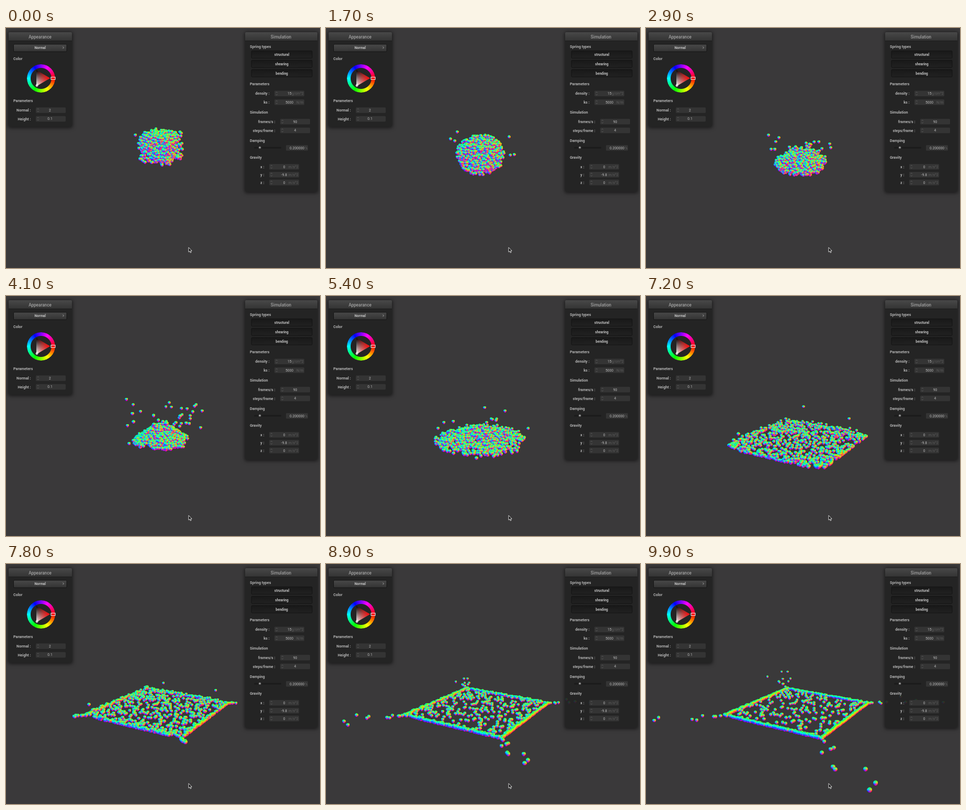
An HTML page with a canvas for the animation above (10000 ms loop, 600 by 457 pixels).

```html
<!DOCTYPE html>
<html lang="en">
<head>
<meta charset="utf-8">
<title>Particle simulation</title>
<style>
html, body { margin: 0; width: 100%; height: 100%; overflow: hidden; background: #3a393a; }
canvas, svg, div { position: absolute; left: 0; top: 0; }
.panel { background: rgba(34,34,34,.9); border-radius: 2px; box-shadow: 0 1px 7px 1px rgba(0,0,0,.6); }
.panel::before { content: ""; display: block; height: 16px; border-radius: 2px 2px 0 0;
  background: linear-gradient(#484848, #343434); border-bottom: 1px solid #1c1c1c; }
.wheel { left: 40px; top: 69px; width: 54px; height: 54px; border-radius: 50%;
  background: conic-gradient(from 90deg, red, yellow, lime, cyan, blue, magenta, red);
  -webkit-mask: radial-gradient(circle, transparent 19.5px, #000 20.5px);
  mask: radial-gradient(circle, transparent 19.5px, #000 20.5px); }
.triangle { left: 58px; top: 80px; width: 26px; height: 31px; clip-path: polygon(0 0, 100% 50%, 0 100%);
  background: linear-gradient(90deg, rgba(255,0,0,0), red), linear-gradient(#000, #fff); }
text { font-family: Roboto, "Open Sans", sans-serif; font-size: 6.7px; fill: #bbb; }
.title { font-size: 8.2px; font-weight: 500; fill: #a2a2a2; text-anchor: middle; }
.label { font-size: 7.15px; font-weight: 700; fill: #b4b4b4; }
.button { font-size: 6.5px; font-weight: 700; fill: #c4c4c4; }
.mid { text-anchor: middle; }
.end { text-anchor: end; }
.unit { fill: #5c5c5c; }
</style>
</head>
<body>
<canvas id="stage" width="600" height="457"></canvas>
<div class="panel" style="left:5px;top:8px;width:121px;height:180px"></div>
<div class="panel" style="left:457px;top:8px;width:138px;height:304px"></div>
<div class="wheel"></div>
<div class="triangle"></div>
<svg id="ui" width="600" height="457">
  <defs>
    <linearGradient id="up" x2="0" y2="1"><stop stop-color="#484848"/><stop offset="1" stop-color="#343434"/></linearGradient>
    <linearGradient id="down" x2="0" y2="1"><stop stop-color="#191919"/><stop offset="1" stop-color="#212121"/></linearGradient>
  </defs>
</svg>
<script>
// Interface
const parts = [];
const text = (x, y, s, cls = "") => parts.push(`<text x="${x}" y="${y}" class="${cls}">${s}</text>`);
const button = (x, y, w, s, fill) => {
  parts.push(`<rect x="${x}" y="${y}" width="${w}" height="14" rx="1.5" fill="url(#${fill})" stroke="#121212" stroke-width=".9"/>`);
  text(x + w / 2, y + 9.4, s, "button mid");
};
const box = (x, y, w = 57) =>
  parts.push(`<rect x="${x}" y="${y - 5.3}" width="${w}" height="10.6" rx="1.5" fill="#343434"/>`);
const field = (label, x, y, value, valueX, unit) => {
  text(x - 9.5, y + 2.5, label + " :", "label end");
  box(x, y);
  parts.push(`<path d="M${x + 2.5} ${y - 1.3}l1.7-1.8 1.7 1.8m0 2.6l-1.7 1.8-1.7-1.8" fill="none" stroke="#636363" stroke-width=".8"/>`);
  text(valueX, y + 2.4, value, unit ? "end" : "mid");
  if (unit) text(x + 55.5, y + 2.4, unit, "unit end");
};

text(65, 19.5, "Appearance", "title");
text(525.5, 19.5, "Simulation", "title");
button(14.5, 31, 101.5, "Normal", "up");
parts.push('<path d="M108.5 35.6l1.8 1.8-1.8 1.8" fill="none" stroke="#bbb" stroke-width=".9"/>');
text(14, 60.6, "Color", "label");
text(14, 141.2, "Parameters", "label");
field("Normal", 57, 156.5, "2", 84);
field("Height", 57, 173, "0.1", 84);
parts.push('<rect x="86" y="93.5" width="8" height="4.5" fill="none" stroke="#fff"/>',
  '<circle cx="59" cy="109.5" r="1.9" fill="none" stroke="#fff"/>');

[["Spring types", 38], ["Parameters", 108.8], ["Simulation", 163], ["Damping", 216.6], ["Gravity", 249]]
  .forEach(([s, y]) => text(466, y, s, "label"));
["structural", "shearing", "bending"].forEach((s, i) => button(469, 43.5 + i * 17.8, 116, s, "down"));
field("density", 513, 124.8, "15", 545.5, "g/cm^2");
field("ks", 513, 141.3, "5000", 549, "N/m");
field("frames/s", 524, 178.3, "90", 552.5);
field("steps/frame", 524, 195, "4", 552.5);
[["x", "0"], ["y", "-9.8"], ["z", "0"]].forEach(([s, v], i) =>
  field(s, 503, 264.3 + i * 14.9, v, i == 1 ? 537 : 533.5, "m/s^2"));
box(535, 228.3, 42);
text(570, 230.7, "0.200000", "end");
text(576, 230.7, "%", "unit end");
parts.push('<rect x="474" y="226.5" width="52" height="3" rx="1.5" fill="#1b1b1b"/>',
  '<circle cx="485" cy="227.8" r="3.2" fill="#444" stroke="#191919" stroke-width=".7"/>',
  '<circle cx="485" cy="227.6" r="1.5" fill="#aaa"/>',
  '<path d="M349 417.8v8.8l2-1.8 1.4 3.2 1.5-.7-1.4-3h2.7z" fill="#111" stroke="#eee" stroke-width=".9"/>');
document.getElementById("ui").insertAdjacentHTML("beforeend", parts.join(""));

// Camera: homogeneous screen vectors of the floor centre, both floor axes and the vertical
const O = [296.5, 275.7, 1], U = [66.7, .95, -.059], V = [89.8, 5.8, .125], H = [-16.6, -164, -.056];
const project = ([u, v, h]) => {
  const [x, y, w] = O.map((o, i) => o + u * U[i] + v * V[i] + h * H[i]);
  return [x / w, y / w, w];
};

let seed = 7;
const rand = (min = 0, max = 1) => {
  seed = seed + 0x6D2B79F5 | 0;
  let t = Math.imul(seed ^ seed >>> 15, 1 | seed);
  t = t + Math.imul(t ^ t >>> 7, 61 | t) ^ t;
  return min + (max - min) * ((t ^ t >>> 14) >>> 0) / 4294967296;
};
const polar = (r, angle, h) => [r * Math.cos(angle), r * Math.sin(angle), h];

// Key poses: block, ball, cone, then a disc that spreads until the walls stop it
const times = [0, 1.7, 4.1, 6.5, 7.8, 8.9, 9.9];
const discs = [1.15, 1.6, 1.95, 2.3];
const strays = 36, leaks = 44;

const makeParticle = () => {
  const cube = [0, 0, 0].map(() => rand(-1, 1));
  const round = Math.max(...cube.map(Math.abs)) / Math.hypot(...cube);
  const [x, y, z] = cube.map(n => n * round);
  const q = Math.hypot(x, y), lift = rand(), bounce = rand() ** 3;
  const s = Math.abs(Math.sqrt(1 - Math.max(0, 1 - q * q) ** 1.5) + rand(-.14, .1));
  const angle = Math.atan2(y, x) + rand(-.2, .2);
  return {
    limit: 1 - .02 * rand() ** 3,
    poses: [
      [.31 * cube[0], .31 * cube[1], .335 + .165 * cube[2]],
      [.46 * x, .46 * y, .23 + .235 * z],
      [.54 * x, .54 * y, .03 * lift + .27 * (1 - q) ** 1.2 * lift],
      ...discs.map((r, i) => polar(r * s, angle, .08 * bounce / (1 + 2 * i)))
    ]
  };
};

// Thrown off the pile, back on the floor later
const makeStray = ({ poses }, i) => {
  const angle = rand(0, 2 * Math.PI);
  poses[2] = polar(rand(.3, .8), angle, rand(.05, .5));
  if (i % 3 == 0) poses[1] = polar(rand(.48, .7), angle, rand(.15, .45));
  if (i % 9 == 0) {
    poses[0] = polar(.5, angle, rand(.4, .5));
    poses[3][2] = rand(.1, .4);
    poses[4][2] = rand(.05, .2);
  }
};

// Slips out through a corner and fans away
const makeLeak = (p, i) => {
  const u = i & 1 ? 1 : -1, v = i & 2 ? 1 : -1, reach = rand() ** 2, side = rand(-.4, .4);
  const out = d => [u * (1 + 1.3 * d) - v * side * d, v * (1 + 1.3 * d) + u * side * d, 0];
  p.limit = 9;
  [-.25, .1 * reach, .55 * reach, reach].forEach((d, k) => p.poses[3 + k] = out(d));
};

const particles = Array.from({ length: 980 }, (_, i) => {
  const p = makeParticle();
  if (i < strays) makeStray(p, i);
  else if (i < strays + leaks) makeLeak(p, i);
  return p;
});

// Ball coloured by its surface normal
const ball = document.createElement("canvas");
ball.width = ball.height = 16;
const ballCtx = ball.getContext("2d"), pixels = ballCtx.createImageData(16, 16);
for (let i = 0; i < 256; i++) {
  const x = (i % 16 - 7.5) / 8, y = (7.5 - (i >> 4)) / 8;
  const d = Math.hypot(x, y), z = Math.sqrt(Math.max(0, 1 - d * d));
  const color = [.42 + .7 * x - .4 * y + .06 * z, .5 + .85 * y + .2 * z, .55 - .65 * x - .25 * y + .1 * z];
  color.forEach((n, c) => pixels.data[i * 4 + c] = 255 * n);
  pixels.data[i * 4 + 3] = 255 * Math.min(1, Math.max(0, (1 - d) * 8 + .5));
}
ballCtx.putImageData(pixels, 0, 0);

const ctx = document.getElementById("stage").getContext("2d");
ctx.imageSmoothingQuality = "high";

const place = (p, key, k) => {
  const to = p.poses[key + 1];
  const [u, v, h] = p.poses[key].map((n, i) => n + (to[i] - n) * k);
  const stop = Math.max(1, Math.abs(u) / p.limit, Math.abs(v) / p.limit);
  return project([u / stop, v / stop, h]);
};

function draw() {
  const t = Math.floor(performance.now() % 10000 / 100) / 10;
  let key = 0;
  while (key < 5 && t >= times[key + 1]) key++;
  const k = (t - times[key]) / (times[key + 1] - times[key]);
  ctx.clearRect(0, 0, 600, 457);
  particles.map(p => place(p, key, k)).sort((a, b) => b[2] - a[2]).forEach(([x, y, w]) => {
    const r = 3 / w;
    ctx.drawImage(ball, x - r, y - r, 2 * r, 2 * r);
  });
  requestAnimationFrame(draw);
}
draw();
</script>
</body>
</html>
```
